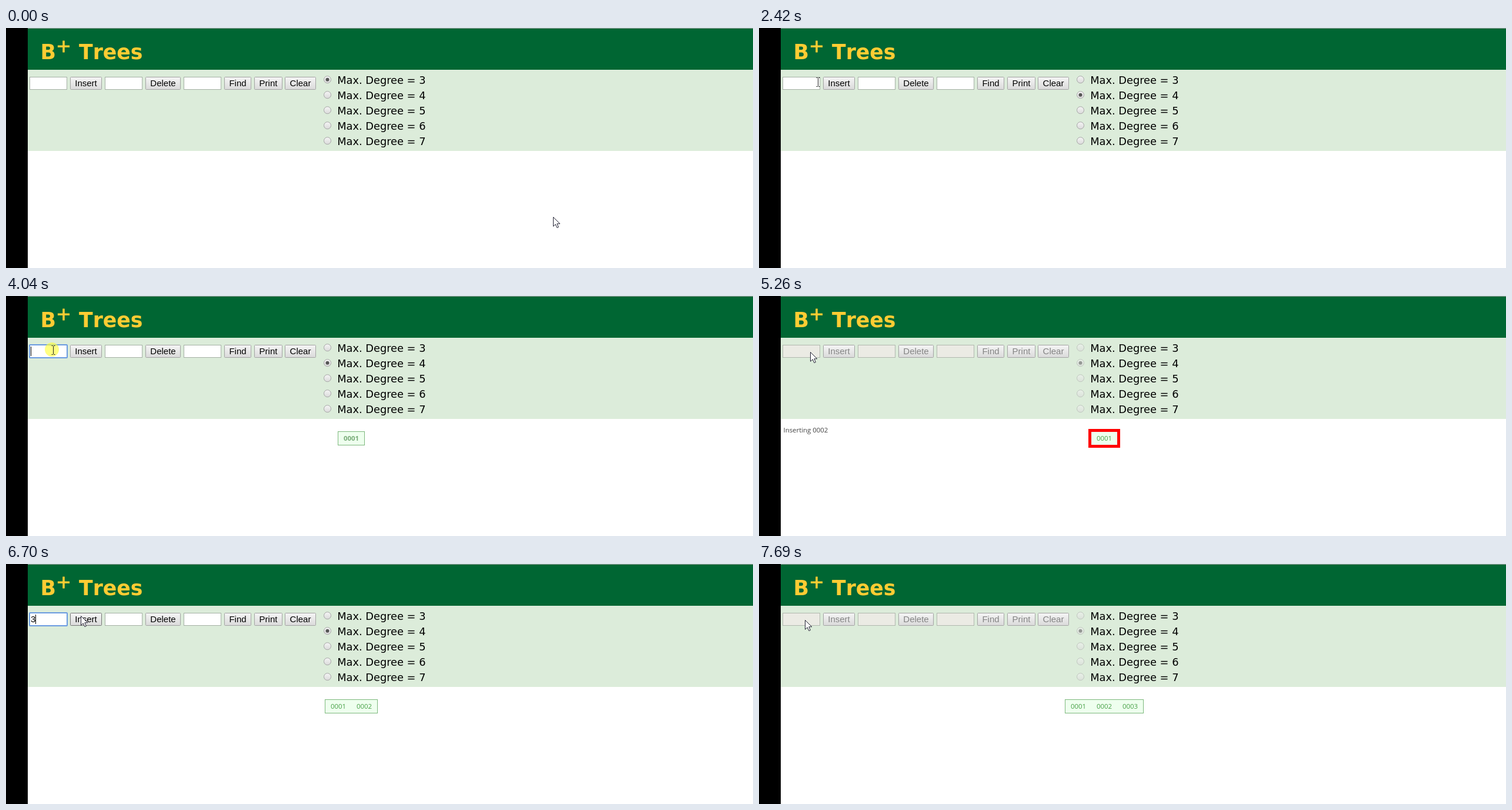
An HTML page for the animation above (8 s loop, 1270x408 px).

```html
<!DOCTYPE html>
<html lang="en">
<head>
<meta charset="utf-8">
<title>B+ Trees</title>
<style>
  html, body { margin: 0; width: 100%; height: 100%; overflow: hidden; background: #fff; }
  svg { display: block; width: 100vw; height: 100vh; }
  text { font-kerning: none; }
  .title { font: bold 34.7px "DejaVu Sans", sans-serif; fill: #fc3; }
  .title .plus { font-weight: normal; font-size: 31px; stroke: #fc3; stroke-width: .8; }
  .label { font: 17.8px "DejaVu Sans", sans-serif; }
  .button text, #value { font: 15px "Liberation Sans", Arial, sans-serif; }
  .button rect { fill: url(#face); stroke: #a3a3a3; }
  .button text { text-anchor: middle; }
  .button.hover rect { stroke: #777; }
  .input { fill: #fff; stroke: #a5b0a5; }
  .radio { fill: url(#face); stroke: #a6a6a6; }
  .dot { fill: #555; }
  .disabled .button text { fill: #848484; }
  .disabled .input { fill: #ebebe4; stroke: #b1b8ae; }
  .disabled .radio, .disabled .dot { opacity: .55; }
  #focus { fill: none; stroke: #6a9be0; stroke-width: 2; }
  #message, #node text { font: 11.4px "Open Sans", sans-serif; }
  #message { fill: #444; }
  #node text { fill: #46a046; text-anchor: middle; }
  #node.fresh text { fill: #77ab77; font-weight: 700; }
  #box { fill: #efe; stroke: #7db87d; }
  #ring { fill: none; stroke: #f00; stroke-width: 5; }
  #click { fill: #ff3; fill-opacity: .62; }
</style>
</head>
<body>
<svg viewBox="0 0 1270 408" preserveAspectRatio="none">
  <defs>
    <linearGradient id="face" x2="0" y2="1">
      <stop stop-color="#f5f5f5"/><stop offset="1" stop-color="#dadada"/>
    </linearGradient>
  </defs>
  <rect width="1270" height="408" fill="#fff"/>
  <rect x="37" y="71" width="1233" height="138" fill="#dcecda"/>
  <rect x="37" width="1233" height="71" fill="#063"/>
  <rect x="37" width="1233" height="1" fill="#9a9f9c"/>
  <rect width="37" height="408" fill="#000"/>
  <g class="title">
    <text x="58.5" y="53">B</text>
    <text class="plus" x="85" y="41">+</text>
    <text x="124" y="53">Trees</text>
  </g>
  <g id="controls"></g>
  <rect id="focus" x="40" y="83" width="64" height="22" rx="1"/>
  <text id="value" x="42" y="98.5"></text>
  <path id="caret" stroke="#000"/>
  <text id="message" x="41.5" y="232"></text>
  <g id="node">
    <rect id="box" y="230.5" height="23"/>
    <rect id="ring" y="228.5" height="27"/>
    <g id="keys"></g>
  </g>
  <circle id="click" r="12"/>
  <path id="arrow" d="M.5.5V16.2L4.2 12.8 6.9 18.6 9.4 17.5 6.8 11.8H11.8Z" fill="#fff" stroke="#223"/>
  <path id="beam" d="M-3-7.5H-1L0-6.5 1-7.5H3M0-6.5V6.5M-3 7.5H-1L0 6.5 1 7.5H3" fill="none" stroke="#222"/>
</svg>
<script>
const LOOP = 8000;
const $ = id => document.getElementById(id);
const show = (el, on) => el.style.display = on ? '' : 'none';

function add(parent, tag, attrs, text = '') {
  const el = document.createElementNS('http://www.w3.org/2000/svg', tag);
  for (const key in attrs) el.setAttribute(key, attrs[key]);
  el.textContent = text;
  return parent.appendChild(el);
}

const controls = $('controls');
for (const x of [40, 168, 302])
  add(controls, 'rect', { class: 'input', x: x + .5, y: 83.5, width: 63, height: 21 });

const buttons = [['Insert', 109, 54], ['Delete', 237, 60], ['Find', 371, 46], ['Print', 422, 48], ['Clear', 474, 53]]
  .map(([name, x, w]) => {
    const g = add(controls, 'g', { class: 'button' });
    add(g, 'rect', { x: x + .5, y: 83.5, width: w - 1, height: 21, rx: 1 });
    add(g, 'text', { x: x + w / 2, y: 98.5 }, name);
    return g;
  });

for (let i = 0; i < 5; i++) {
  add(controls, 'circle', { class: 'radio', cx: 546.5, cy: 87.7 + 26 * i, r: 6 });
  add(controls, 'text', { class: 'label', x: 563.2, y: 95 + 26 * i }, 'Max. Degree = ' + (i + 3));
}
const dot = add(controls, 'circle', { class: 'dot', cx: 546.5, r: 3 });

// Pointer: time, x, y, shape (a = arrow, i = text beam; capital = pressed)
const pointer = [
  [0, 930, 321, 'a'], [200, 905, 303, 'a'], [400, 808, 232, 'a'], [600, 680, 160, 'a'],
  [800, 592, 115, 'a'], [1000, 552, 100, 'a'], [1200, 542, 111, 'a'], [1420, 542, 111, 'A'],
  [1620, 530, 117, 'a'], [1820, 455, 134, 'a'], [2020, 345, 139, 'a'], [2220, 120, 112, 'a'],
  [2420, 100, 92, 'i'], [2620, 100, 91, 'I'], [2840, 100, 92, 'i'], [3040, 114, 96, 'a'],
  [3240, 132, 100, 'A'], [3460, 132, 100, 'a'], [3640, 126, 101, 'a'], [3840, 98, 93, 'i'],
  [4040, 80, 92, 'I'], [4260, 80, 92, 'i'], [4460, 112, 94, 'a'], [4680, 127, 96, 'A'],
  [4880, 124, 97, 'a'], [5060, 104, 96, 'a'], [5260, 87, 95, 'a'], [5460, 83, 95, 'a'],
  [5900, 82, 93, 'i'], [6280, 82, 93, 'I'], [6480, 90, 92, 'i'], [6700, 127, 88, 'a'],
  [6880, 127, 92, 'a'], [7100, 108, 96, 'a'], [7310, 88, 97, 'a'], [7510, 81, 95, 'a'], [7690, 78, 95, 'a']
];

// One entry per key: focus, typed, insert, highlight, placed, cleared, enabled
const inserts = [
  [2620, 2840, 3460, 3640, 3640, 3840, 3840],
  [4040, 4260, 4880, 5060, 5460, 5680, 5900],
  [6280, 6480, 6880, 7100, 7510, 7690, LOOP]
];

function drawNode(count, lit, fresh) {
  const w = 44 * count + 1, left = 587 - w / 2;
  show($('node'), count);
  $('node').setAttribute('class', fresh ? 'fresh' : '');
  $('box').setAttribute('x', left);
  $('box').setAttribute('width', w);
  $('ring').setAttribute('x', left - 2);
  $('ring').setAttribute('width', w + 4);
  show($('ring'), lit);
  $('keys').replaceChildren();
  for (let i = 0; i < count; i++)
    add($('keys'), 'text', { x: left + 22.5 + 44 * i, y: 246 }, '000' + (i + 1));
}

function drawPointer(t) {
  const [, x, y, shape] = pointer.findLast(p => p[0] <= t);
  const arrow = shape.toLowerCase() === 'a';
  show($('arrow'), arrow);
  show($('beam'), !arrow);
  show($('click'), shape < 'a');
  $('arrow').setAttribute('transform', `translate(${x} ${y})`);
  $('beam').setAttribute('transform', `translate(${x + .5} ${y})`);
  $('click').setAttribute('transform', `translate(${arrow ? x : x - 2} ${y - (arrow ? 0 : 1)})`);
  buttons[0].classList.toggle('hover', arrow && x > 108 && x < 164 && y > 82 && y < 106);
}

let last;
function draw(t) {
  const stamp = [...pointer.map(p => p[0]), ...inserts.flat()].filter(s => s <= t).length;
  if (stamp === last) return;
  last = stamp;
  let focused = false, value = '', message = '', count = 0, lit = false, disabled = false;
  inserts.forEach(([focus, typed, insert, highlight, placed, cleared, enabled], i) => {
    const within = (a, b) => t >= a && t < b;
    if (within(focus, insert)) focused = true;
    if (within(typed, insert)) value = String(i + 1);
    if (within(insert, cleared)) message = 'Inserting 000' + (i + 1);
    if (within(insert, enabled)) disabled = true;
    if (within(highlight, placed)) lit = true;
    if (t >= placed) count = i + 1;
  });
  controls.setAttribute('class', disabled ? 'disabled' : '');
  dot.setAttribute('cy', t < 1620 ? 87.7 : 113.7);
  show($('focus'), focused);
  show($('caret'), focused);
  $('caret').setAttribute('d', `M${value ? 50.5 : 42.5} 86V102`);
  $('value').textContent = value;
  $('message').textContent = message;
  drawNode(count, lit, count === 1 && !lit);
  drawPointer(t);
}

const start = performance.now();
function tick() {
  draw((performance.now() - start) % LOOP);
  requestAnimationFrame(tick);
}
tick();
</script>
</body>
</html>
```
